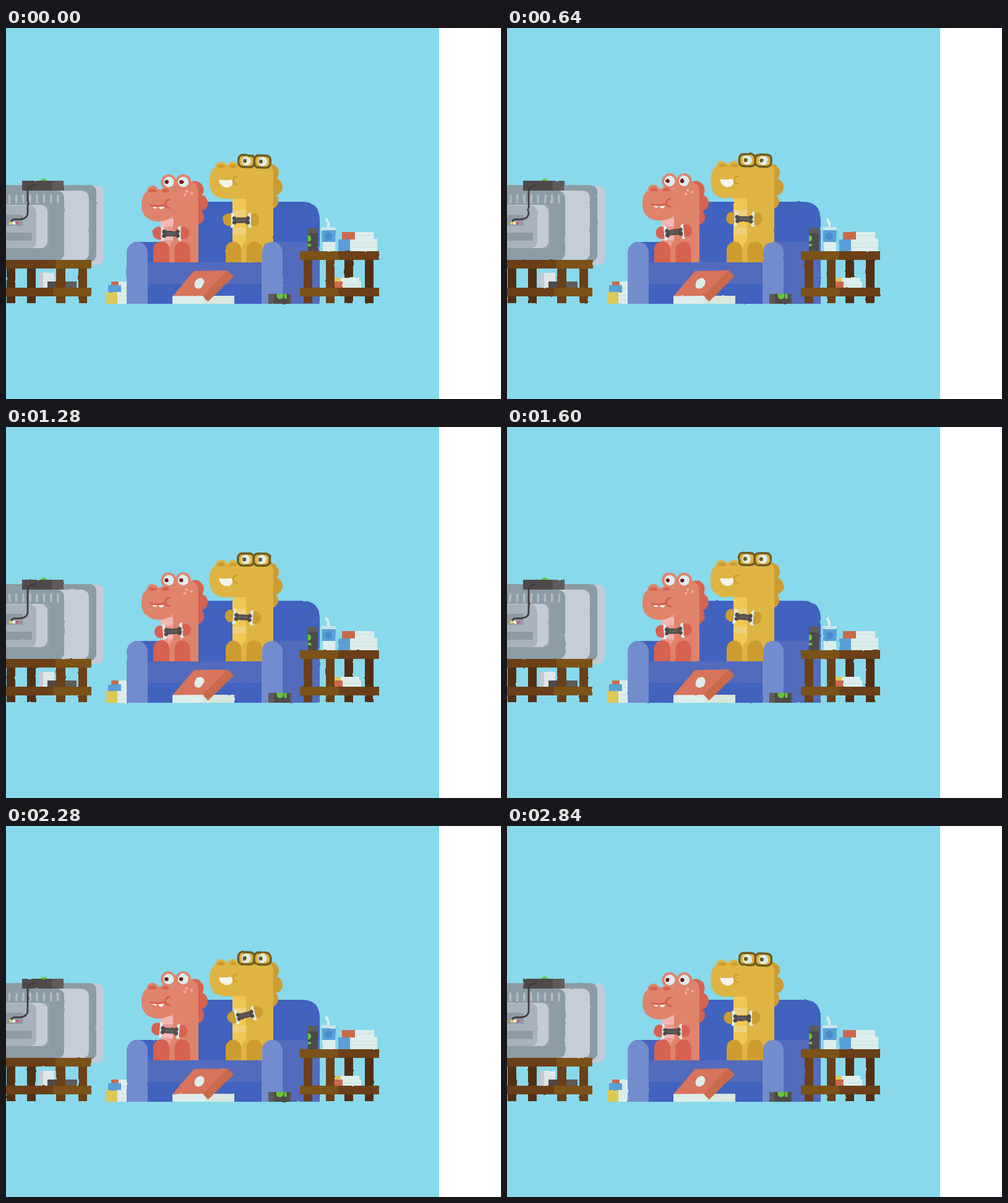
Write an HTML page that moves like this. It is 800 px wide and 600 px high and loops after 2880 ms.

```html
<!DOCTYPE html>
<html lang="en">
<head>
<meta charset="utf-8">
<title>Couch gamers</title>
<style>
html, body { margin: 0; width: 100%; height: 100%; overflow: hidden; background: #fff; }
svg { display: block; }
.white { fill: #dcedec; } .dark { fill: #4f4a4a; } .grey { fill: #5e5b5a; } .green { fill: #66c43c; }
.wood1 { fill: #7b5218; } .wood2 { fill: #6b4018; } .wood3 { fill: #522f12; }
.navy { fill: #4162bf; } .blue { fill: #526bbd; } .arm { fill: #738ccd; }
.red { fill: #c96a4b; } .sky { fill: #5a9fd6; } .yellow { fill: #dcc857; }
.pink { fill: #df836b; } .coral { fill: #d66250; } .gold { fill: #deb443; } .ochre { fill: #cd9c31; }
.line { fill: none; stroke-width: 2.6; stroke-linecap: round; }
</style>
</head>
<body>
<svg width="800" height="600" viewBox="0 0 800 600">
<defs>
  <filter id="rough" filterUnits="userSpaceOnUse" x="-20" y="190" width="640" height="265" color-interpolation-filters="sRGB">
    <feTurbulence id="noise" type="fractalNoise" baseFrequency=".09" numOctaves="1" result="n"/>
    <feDisplacementMap in="SourceGraphic" in2="n" scale="2.4" xChannelSelector="R" yChannelSelector="G"/>
  </filter>
  <g id="pad">
    <path class="white" d="M-17-12h4l2 3-1.500 3 1.500 3-1.500 3 1.500 3-1.500 3 1.500 3-2 3h-4zM17-12h-4l-2 3 1.500 3-1.500 3 1.500 3-1.500 3 1.500 3-1.500 3 2 3h4z"/>
    <path fill="currentColor" d="M-16-11h-6a10.500 10.500 0 0 0 0 20h6zM16-11h6a10.500 10.500 0 0 1 0 20h-6z"/>
    <path class="dark" d="M-10-4.500H10V4.500H-10z"/>
    <g class="dark"><circle cx="-11" cy="-3" r="3.200"/><circle cx="11" cy="-3" r="3.200"/><circle cx="-11" cy="3.500" r="3.200"/><circle cx="11" cy="3.500" r="3.200"/></g>
    <path class="grey" d="M-8-2.500H8V2.500H-8z"/>
  </g>
</defs>

<path fill="#88d9eb" d="M0 0h700v600H0z"/>

<g filter="url(#rough)">
  <!-- television -->
  <rect x="-20" y="255" width="178" height="128" rx="10" fill="#c3cbd6"/>
  <rect x="-20" y="254" width="166" height="124" rx="11" fill="#8a9ba5"/>
  <rect x="-20" y="263" width="154" height="113" rx="12" fill="#c5cdd7"/>
  <rect x="-20" y="263" width="114" height="113" rx="12" fill="#8b9ca6"/>
  <path fill="#95a2ad" d="M-20 286H70V356H-20z"/>
  <path stroke="#b1bbc6" stroke-width="3.500" stroke-linecap="round" d="M5.500 271v11m11.200-11v11m11.200-11v11m11.200-11v11m11.200-11v11m11.200-11v11m11.200-11v11m11.200-11v11"/>
  <rect x="-20" y="286" width="87" height="70" rx="11" fill="#c3cbd6"/>
  <rect x="-20" y="287" width="69" height="69" rx="10" fill="#a7b2be"/>
  <path fill="#8e9ba7" d="M-20 302H27v18H-20zM-20 331H42v13H-20z"/>
  <circle cx="61" cy="248.500" r="5.300" class="green"/>
  <path class="dark" d="M26 247H75v16H26z"/><path class="grey" d="M74 247h19v16H74z"/>
  <path fill="none" stroke="#433d40" stroke-width="2.800" d="M8 314q1-5 9-4.500 18 1 18-11V262q0-7 14-8"/>
  <circle cx="7.500" cy="315.500" r="2.500" fill="#e5d04b"/><circle cx="12.700" cy="315.500" r="2.500" fill="#eef3f3"/><circle cx="18" cy="315.500" r="2.500" fill="#d45b73"/>

  <!-- television stand -->
  <path fill="#c3cbd6" d="M53 396h8v24h-8z"/><path fill="#dfe6ea" d="M60 396h18v24H60z"/>
  <path class="dark" d="M67 410h28v10H67z"/><path class="grey" d="M95 410h19v10H95z"/>
  <path class="wood3" d="M1 388h14v57H1zM34 388h14v57H34z"/>
  <path class="wood2" d="M81 388h15v57H81zM117 388h14v57h-14zM-20 375H80v14H-20zM-20 420H76v14H-20z"/>
  <path class="wood1" d="M80 375h58v14H80zM76 420h62v14H76z"/>

  <!-- books on the floor -->
  <path class="red" d="M170 410h13v7h-13z"/><path class="sky" d="M165 416h22v11h-22z"/><path class="yellow" d="M162 427h19v19h-19z"/>
  <path class="white" d="M182 410h30v6h4v11h7v19h-43V427h6V416h-4z"/>
  <path fill="none" stroke="#cbdfda" d="M186 421h28M181 433h41M181 440h41"/>

  <!-- sofa -->
  <path class="navy" d="M300 281H479Q507 281 507 311V446H300z"/>
  <path class="navy" d="M207 346H420V446H207z"/>
  <path class="blue" d="M430 346H507V446H430zM229 379H414v35H229z"/>
  <path class="arm" d="M195 446V363a17 17 0 0 1 34 0V446zM413 446V363a17 17 0 0 1 34 0V446z"/>

  <!-- small dinosaur -->
  <g class="coral"><circle cx="305" cy="262" r="14.500"/><circle cx="311.500" cy="283" r="14.500"/><circle cx="306.500" cy="306" r="13.500"/></g>
  <path class="pink" d="M250 379V300l20-35V248H295Q311 248 311 267V379z"/>
  <path fill="#e99b91" d="M250 300h20v45q-4 1-6 12l-14 22z"/>
  <path fill="#f2b7b4" d="M250 308h20v13h-20zM250 335h20v8h-20z"/>
  <g id="smallHead">
    <g class="pink">
      <path d="M219 286Q219 262 239 261H290V292Q275 291 270 304Q260 313 246 313Q219 311 219 286z"/>
      <circle cx="237" cy="264" r="9.300"/><circle cx="258" cy="265" r="8"/>
      <circle cx="263" cy="249" r="12.500"/><circle cx="286.500" cy="249" r="12.500"/>
    </g>
    <path class="coral" d="M230 265q1-5 7-5t7 5q-7 1.500-14 0zM252 265q1-5 6-5t6 5q-6 1.500-12 0z"/>
    <circle class="white" cx="263" cy="249" r="8.500"/><circle class="white" cx="286.500" cy="249" r="8.500"/>
    <circle cx="259.700" cy="249" r="3.200" fill="#70181b"/><circle cx="283.300" cy="249" r="3.200" fill="#70181b"/>
    <path fill="#f5f4ed" d="M237 288h8q0 4-3.500 4t-4.500-4zM246.500 289h9q-1 4-4.500 4t-4.500-4z"/>
    <path class="line" stroke="#d65a49" d="M234 286.500q11 3.500 23-.5M264.500 277.500q-7 1-7 7t7 6.500"/>
    <g fill="#f0a69c"><circle cx="292" cy="264" r="2.400"/><circle cx="289" cy="270" r="2.400"/><circle cx="300" cy="267" r="2.400"/></g>
  </g>
  <path class="coral" d="M238 379V358a13 13 0 0 1 26 0V379zM272.500 379V358a12.500 12.500 0 0 1 25 0V379z"/>
  <use id="smallPad" href="#pad" color="#d66250"/>

  <!-- tall dinosaur -->
  <g class="ochre"><circle cx="427" cy="234" r="14"/><circle cx="432.500" cy="257" r="14.500"/><circle cx="427" cy="280" r="13"/></g>
  <path class="gold" d="M366 379V222H421Q432 222 432 235V346Q414 346 414 364V379z"/>
  <path fill="#efc854" d="M366 272h16q6 0 6 6V345q-6 4-8 14l-14 20z"/>
  <path fill="#efd07d" d="M366 294h22v11h-22zM366 323h22v11h-22z"/>
  <g id="tallHead">
    <g class="gold">
      <path d="M329 248Q329 222 350 221H420Q432 221 432 234V276H355Q329 276 329 248z"/>
      <circle cx="347.500" cy="225.500" r="9.500"/><circle cx="366.500" cy="224.500" r="8.500"/>
    </g>
    <path class="ochre" d="M341 225q1-5 6.500-5t6.500 5q-6 1.500-13 0zM361 225q1-5 6-5t6 5q-6 1.500-12 0z"/>
    <path fill="#f3f4ea" d="M344 245.500q11 1 23-.5 0 13-10 13t-13-12.500z"/>
    <path class="line" stroke="#cd9c31" d="M374 240.500q-7 0-7 6t7 6.500"/>
  </g>
  <g id="glasses">
    <rect x="-25.800" y="-9.700" width="26" height="19.500" rx="7" fill="#e1b13a" stroke="#6b5b25" stroke-width="3.500"/>
    <rect x="-.2" y="-9.700" width="26" height="19.500" rx="7" fill="#e1b13a" stroke="#6b5b25" stroke-width="3.500"/>
    <circle class="white" cx="-13" cy="0" r="7.500"/><circle class="white" cx="13" cy="0" r="7.500"/>
    <circle cx="-15.500" cy="0" r="3.200" fill="#6b5b25"/><circle cx="10.300" cy="0" r="3.200" fill="#6b5b25"/>
  </g>
  <path class="ochre" d="M355 379V358a12.500 12.500 0 0 1 25 0V379zM388.500 379V358a12.700 12.700 0 0 1 25.400 0V379z"/>
  <use id="tallPad" href="#pad" color="#cd9c31"/>

  <!-- open box -->
  <path class="white" d="M269 433h51v13h-51z"/><path fill="#d9e7dd" d="M319 433h50v13h-50z"/>
  <path fill="#d8735c" d="M269 433.500 304 393 359 392 319 433z"/>
  <path class="red" d="M358.500 392 368 402 326.500 442.500 318 433z"/>
  <ellipse class="white" cx="312.500" cy="413" rx="7.200" ry="9.300" transform="rotate(35 312.500 413)"/>

  <!-- lying can -->
  <path class="dark" d="M424 430h37v16h-37z"/><path class="grey" d="M424 430h9v16h-9zM458 430h3v16h-3z"/>
  <path class="green" d="M437.500 430h11v3a5.500 5.500 0 0 1-11 0zM449.500 430h4v8h-4z"/>

  <!-- side table -->
  <path class="yellow" d="M531 404h11v7h-11z"/><path class="red" d="M531 410h14v10h-14z"/>
  <path class="white" d="M541 404h30v6h3v10h-30V410h-3z"/>
  <path class="wood3" d="M547 374h14v47h-14zM547 433h14v12h-14zM580 374h14v71h-14z"/>
  <path class="yellow" d="M531 404h10v6h-10z"/><path class="red" d="M531 410h13v10h-13z"/>
  <path class="white" d="M541 404h30v6h3v10h-30V410h-3z"/><path stroke="#cbdfda" d="M545 415h28"/>
  <path class="wood2" d="M481 374h14v71h-14zM517 374h14v71h-14zM536 361h67v14h-67zM536 420h67v14h-67z"/>
  <path class="wood1" d="M475 361h62v14h-62zM475 420h62v14h-62z"/>
  <path class="dark" d="M488 324h16v37h-16z"/><path class="grey" d="M488 323h16v9h-16z"/>
  <path class="green" d="M488 335a5.200 5.200 0 0 1 0 10.400zM488 349h5v4h-5z"/>
  <path fill="none" stroke="#dcedec" stroke-width="4" d="M521 324v-8l-4-8"/>
  <path class="white" d="M511 322h21v39h-20z"/><path fill="#c8e5ed" d="M510 322h23v5h-23z"/>
  <path class="sky" d="M510.500 327h22.500l-1 19h-21z"/><circle cx="521" cy="337" r="6" fill="#498bcc"/>
  <path class="red" d="M543 330h22v12h-22z"/><path class="sky" d="M537 342h20v19h-20z"/>
  <path class="white" d="M564 330h31v11h5v20h-44V342h8z"/>
  <path fill="none" stroke="#cbdfda" d="M565 335.500h29M557 348h42M557 354.500h42"/>
</g>
</svg>
<script>
const LOOP = 2880, STEP = 40;
const times = [0, 640, 960, 1600, 2000, 2280, 2840, LOOP];
// x, y and rotation offsets at each of the times
const poses = {
  smallPad: [[0,0,0], [3.3,-2,-5], [3,-1.3,-5], [2.8,-2.5,-4], [-1.7,-1.3,3.5], [-2.3,-1.5,5], [0,0,0], [0,0,0]],
  tallPad: [[0,0,0], [3.5,-2,1.5], [3.8,-2.8,2], [2.3,-3.5,6], [2.2,-4,3], [6.5,-5,-13], [0,0,0], [0,0,0]],
  smallHead: [[0,0,0], [-.2,-1.5,0], [-.2,-1.4,0], [-.1,-.9,0], [-.2,-1.4,0], [-.2,-1.4,0], [0,0,0], [0,0,0]],
  tallHead: [[0,0,0], [0,-.8,0], [-.1,-.4,0], [-.2,-.9,0], [-.2,-.3,0], [0,-.8,0], [0,0,0], [0,0,0]],
  glasses: [[0,0,2], [-.3,-1.4,1.5], [-.8,-.4,.5], [-1.1,-2,.8], [-.9,-.3,0], [-.3,-1.4,1.2], [0,0,2], [0,0,2]]
};
const origins = { smallPad: [266.5, 332.5], tallPad: [380, 311], glasses: [401.5, 215.5] };
const byId = id => document.getElementById(id);

function draw(now) {
  const step = Math.floor(now % LOOP / STEP), t = step * STEP;
  const i = times.findIndex((start, k) => t >= start && t < times[k + 1]);
  const u = (t - times[i]) / (times[i + 1] - times[i]), ease = u * u * (3 - 2 * u);
  for (const id in poses) {
    const [x, y, angle] = poses[id][i].map((a, k) => a + (poses[id][i + 1][k] - a) * ease);
    const [ox, oy] = origins[id] || [0, 0];
    byId(id).setAttribute("transform", `translate(${ox + x} ${oy + y}) rotate(${angle})`);
  }
  byId("noise").setAttribute("seed", step + 1);
}

const begin = performance.now();
function tick() {
  draw(performance.now() - begin);
  requestAnimationFrame(tick);
}
tick();
</script>
</body>
</html>
```
